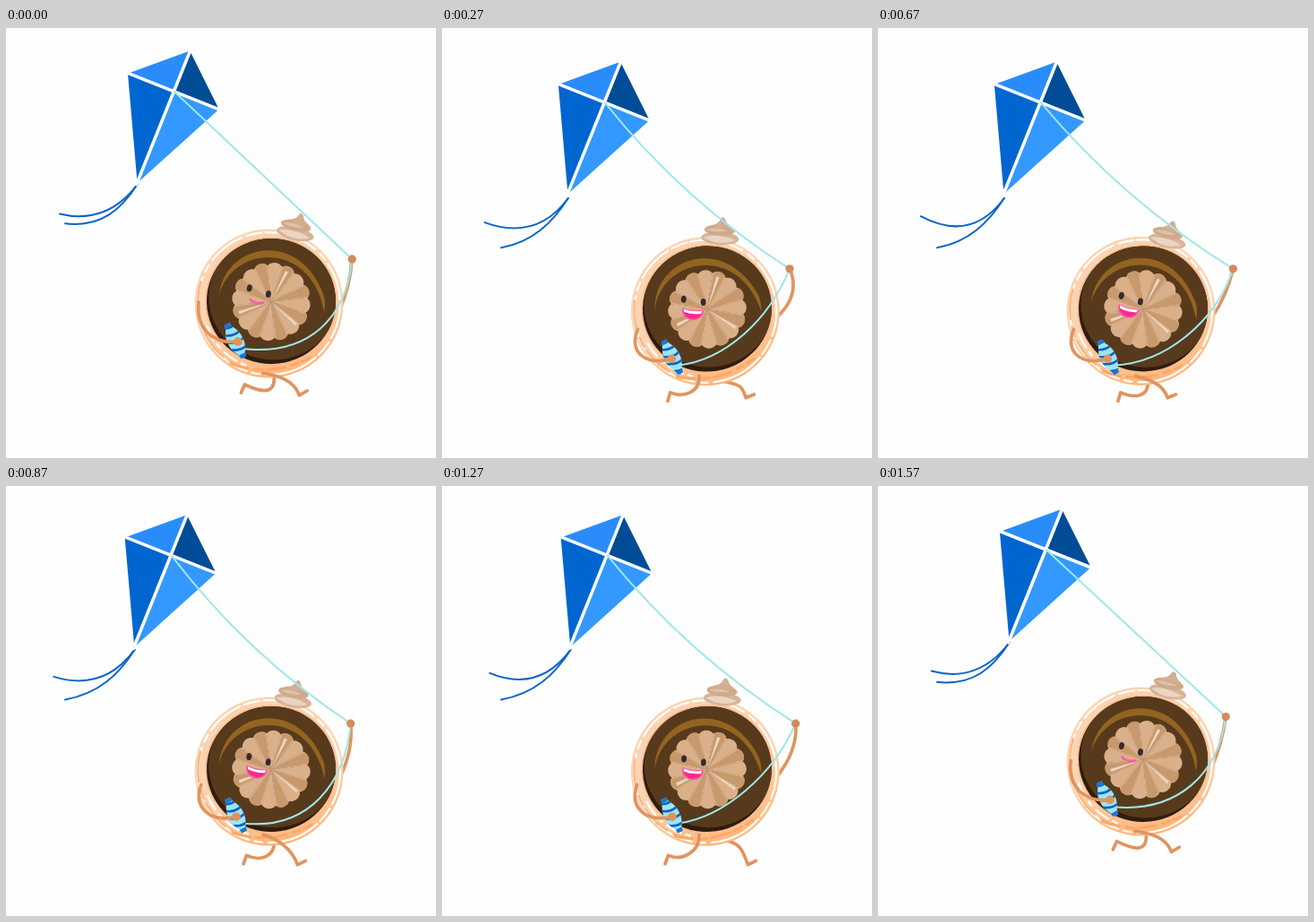
Write an HTML page that moves like this. It is 480 px wide and 480 px high and loops after 1610 ms.

```html
<!DOCTYPE html>
<html lang="en">
<head>
<meta charset="utf-8">
<title>Flying a kite</title>
<style>
  html, body { margin: 0; width: 100%; height: 100%; overflow: hidden; background: #fefefe; }
  svg { display: block; width: 100%; height: 100%; }
  .line { fill: none; stroke-linecap: round; stroke-linejoin: round; }
  .limb { stroke: #e0945f; stroke-width: 3.7; }
  .string { stroke: #9ee7e9; stroke-width: 2; }
  .tail { stroke: #0a64c8; stroke-width: 2; }
</style>
</head>
<body>
<svg viewBox="0 0 480 480">
  <defs>
    <linearGradient id="crust" x1=".35" y1="0" x2=".6" y2="1">
      <stop offset="0" stop-color="#fbd3b0"/>
      <stop offset=".55" stop-color="#fdd5b2"/>
      <stop offset="1" stop-color="#ffb578"/>
    </linearGradient>
    <clipPath id="bowl"><ellipse cx="296" cy="305" rx="72" ry="70"/></clipPath>
    <clipPath id="reel"><path d="M-3-21H3L4-16Q14 0 4 16L3 21H-3L-4 16Q-14 0-4-16Z"/></clipPath>
  </defs>

  <path id="tailA" class="line tail"/>
  <path id="tailB" class="line tail"/>
  <g id="kite">
    <path d="M205.3 25.5L136 50.7L188 70Z" fill="#2a8cfb"/>
    <path d="M205.3 25.5L237.8 90.6L188 70Z" fill="#004c97"/>
    <path d="M136 50.7L146.6 173L188 70Z" fill="#0066cf"/>
    <path d="M237.8 90.6L146.6 173L188 70Z" fill="#3398ff"/>
    <path d="M207 22L145 176M133 49L241 92" stroke="#fefefe" stroke-width="3.6"/>
  </g>

  <path id="farArm" class="line limb"/>
  <path id="farLeg" class="line limb"/>

  <g id="body">
    <circle cx="293.5" cy="307.5" r="83" fill="url(#crust)"/>
    <g class="line">
      <circle cx="293.5" cy="307.5" r="79.5" stroke="#fff" stroke-width="2.2" stroke-dasharray="42 5 18 4 60 7 9 6"/>
      <path d="M224 332A74 74 0 0 0 272 378" stroke="#fff" stroke-width="2.4" stroke-dasharray="17 6 5 7"/>
      <path d="M218 282A79 79 0 0 0 262 379" stroke="#f9b27c" stroke-width="2" stroke-dasharray="34 8 12 5"/>
      <path d="M250 374Q292 391 338 369" stroke="#ffa765" stroke-width="3" stroke-dasharray="20 7 9 5"/>
      <ellipse cx="296" cy="305" rx="72.5" ry="70.5" stroke="#f6bd92" stroke-width="2"/>
    </g>
    <g clip-path="url(#bowl)">
      <rect x="220" y="230" width="154" height="150" fill="#301c0d"/>
      <ellipse cx="299" cy="300.5" rx="72.5" ry="70" fill="#573a1c"/>
    </g>
    <path d="M238 297C246 238 330 225 355 300Q357 310 355 318C342 237 254 241 238 297Z" fill="#936421"/>
    <g id="cookie"></g>
    <ellipse cx="272" cy="290" rx="2.9" ry="4" fill="#352b2d" transform="rotate(14 272 290)"/>
    <ellipse cx="293" cy="297" rx="2.9" ry="4" fill="#352b2d" transform="rotate(14 293 297)"/>
    <g transform="translate(280 304) rotate(15)">
      <path id="lips" fill="#f72b8b" stroke="#f85da5" stroke-width="1.6" stroke-linejoin="round"/>
      <path id="teeth" fill="#fff"/>
    </g>
    <g transform="translate(324 229) rotate(13)">
      <ellipse cy="1" rx="21" ry="7.5" fill="#d8b497"/>
      <path d="M-19 1Q-4-5 17 2Q6 8-9 5Z" fill="#ead5c3"/>
      <ellipse cx="-1" cy="-8" rx="17" ry="6" fill="#d0a98b"/>
      <path d="M-16-8Q-5-12 8-8Q-4-4-16-8Z" fill="#dfc0a8"/>
      <path d="M-11-13Q-2-15-1-20Q2-25 5-20Q6-15 13-12Q2-8-11-13Z" fill="#d3ae91"/>
    </g>
  </g>

  <path id="nearLeg" class="line limb"/>
  <path id="lowString" class="line string"/>
  <path id="highString" class="line string"/>
  <circle id="farHand" r="4.6" fill="#d48a5b"/>
  <g id="spool">
    <g clip-path="url(#reel)">
      <rect x="-10" y="-22" width="20" height="44" fill="#9be4f5"/>
      <path id="stripes" class="line" stroke="#0a63c4" stroke-width="2.6"/>
      <path d="M-9-19H9M-9 19H9" stroke="#1577dc" stroke-width="5"/>
    </g>
  </g>
  <path id="nearArm" class="line limb"/>
  <circle id="nearHand" r="4.8" fill="#dc945f"/>
</svg>
<script>
const LOOP = 1610, STEPS = 48, STRIDE = 24;
const { PI, cos, sin, tanh, min, max, floor, round } = Math;
const $ = id => document.getElementById(id);
const set = (id, attrs) => {
  for (const name in attrs) $(id).setAttribute(name, attrs[name]);
};

// Points are [x, y] pairs.
const add = ([x, y], dx, dy) => [x + dx, y + dy];
const mix = (a, b, u) => a.map((v, i) => v + (b[i] - v) * u);
const cubic = (a, b, c, d) => `M${a}C${b} ${c} ${d}`;

function bakeCookie() {
  const cx = 296, cy = 305.5, lobes = 16, half = PI / lobes;
  const point = (a, r) => [cx + r * cos(a), cy + r * sin(a)].map(v => v.toFixed(1));
  const wedge = (a, w, r, fill) =>
    `<path d="M${cx} ${cy}L${point(a - w, r)}A10 10 0 0 1 ${point(a + w, r)}Z" fill="${fill}"/>`;
  let light = '', dark = '', streaks = '';
  for (let i = 0; i < lobes; i++) {
    const a = (i + .3) * 2 * half;
    light += wedge(a, half * 1.02, 40.5, '#dab08b');
    if (i % 2) dark += wedge(a, half * .8, 42.1, '#c7996c');
  }
  for (const a of [-1.08, .75, 2.83]) streaks += wedge(a, .045, 38, '#ecd5c2');
  $('cookie').innerHTML = light + dark + streaks;
}

// One walk cycle serves both legs, half a stride apart.
function drawLeg(id, phase, hip, shift, drop) {
  const s = tanh(2 * cos(phase + .17)), front = (1 + s) / 2;
  const ankle = [297 + shift + 40 * s, 404 + 6 * cos(phase) + 3 * sin(2 * phase) + drop];
  const tilt = (42 - 75 * s) * PI / 180;
  const toe = add(ankle, 10 * cos(tilt), 10 * sin(tilt));
  const thigh = mix(add(hip, 0, 20), add(hip, 17, 3), front);
  const shin = mix(add(ankle, 16, 8), add(ankle, -7, -18), front);
  set(id, { d: `${cubic(hip, thigh, shin, ankle)}L${toe}` });
}

function draw(step) {
  const t = 2 * PI * step / STRIDE;
  // Body and kite bounce twice per stride, the kite a little later.
  const drop = max(0, 9.7 - 12 * cos(2 * t + .63));
  const sink = 9.5 - 9.7 * cos(2 * t + .23);
  const loose = tanh(sink / 8);
  const open = min(1, drop / 7);

  const kx = -sink / 2;
  set('kite', { transform: `translate(${kx} ${sink})` });
  const root = [147 + kx, 174 + sink * 1.3];
  set('tailA', { d: cubic(root, add(root, -22, 30), add(root, -52, 42), [60 - sink, 207.5 + sink / 2 + 4 * sin(t)]) });
  set('tailB', { d: cubic(root, add(root, -18, 28), add(root, -40, 49), [66, 218 + 30 * loose]) });

  const lean = 13.6 + 5.3 * cos(t + .5);
  set('body', { transform: `translate(0 ${drop}) rotate(${lean - 19} 296 305)` });
  const w = 8 + 3.5 * open, deep = 4 + 10 * open;
  set('lips', { d: `M${-w} ${-open}Q0 ${4 - 2 * open} ${w} ${-open}C${w} ${deep} ${-w} ${deep} ${-w} ${-open}Z` });
  set('teeth', { d: open < .3 ? '' : `M${1 - w} -.5Q0 2.4 ${w - 1} -.5L${w - 2} 2.6Q0 5 ${2 - w} 2.6Z` });

  const far = [391 + 6.5 * cos(t - 4.36) - 2.5 * cos(2 * t), 267 - 9.6 * cos(2 * t + .33)];
  const elbow = add(far, 3 + 10 * cos(t - 2.1), 30);
  set('farArm', { d: `M372 ${316 + drop}Q${elbow} ${far}` });
  set('farHand', { cx: far[0], cy: far[1] });

  const sway = (tight, slack) => add(mix(tight, slack, loose), 0, drop);
  const near = sway([259, 350], [256, 362]);
  set('nearArm', { d: cubic(sway([215, 306], [219, 330]), sway([212, 335], [208, 352]), sway([230, 353], [223, 371]), near) });
  set('nearHand', { cx: near[0], cy: near[1] });

  const spool = add(near, 4 * loose - 3, -1 - loose);
  set('spool', { transform: `translate(${spool}) rotate(-27)` });
  let stripes = '';
  for (let y = -27 + step % 12 * .75; y < 30; y += 9) stripes += `M-10 ${y - 3}Q0 ${y + 5} 10 ${y + 1}`;
  set('stripes', { d: stripes });

  const belly = ((1 + cos(t - .26)) / 2) ** 3;
  const end = add(spool, 7.5, 9);
  set('lowString', { d: cubic(far, add(far, 20 * belly - 25, 58 + 8 * belly), add(end, 50 + 26 * belly, 16 * belly - 7), end) });
  const tie = [188 + kx, 71 + sink], sag = min(23, 1.4 * (sink + drop));
  set('highString', { d: `M${tie}Q${add(mix(tie, far, .5), -.67 * sag, .74 * sag)} ${far}` });

  const hipX = 308 + 9 * tanh(2 * cos(t + PI));
  drawLeg('nearLeg', t, [287, 385 + drop * .4], -8, drop);
  drawLeg('farLeg', t + PI, [hipX, 391 + drop * .4], 8, drop);
}

// Thirty poses a second, each starting on a whole hundredth.
const startOf = n => round(n * 10 / 3) * 10;
function stepAt(ms) {
  let n = floor(ms * .03);
  if (ms >= startOf(n + 1)) n++;
  else if (ms < startOf(n)) n--;
  return min(n, STEPS - 1);
}

bakeCookie();
draw(0);
let begin;
function tick(now) {
  begin ??= now;
  draw(stepAt(max(0, now - begin) % LOOP));
  requestAnimationFrame(tick);
}
requestAnimationFrame(tick);
</script>
</body>
</html>
```
